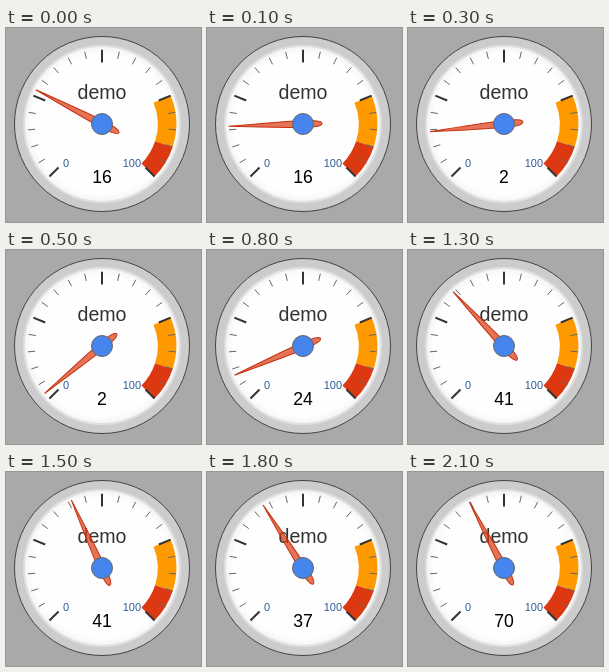
These frames come from a looping animation (195 px wide and 194 px high, 2200 ms). An HTML page with a canvas:

```html
<!DOCTYPE html>
<html>
<head>
<meta charset="utf-8">
<style>
html, body { margin: 0; width: 100%; height: 100%; overflow: hidden; background: #a9a9a9; }
canvas { display: block; }
</style>
</head>
<body>
<canvas id="stage" width="195" height="194"></canvas>
<script>
const ctx = document.getElementById('stage').getContext('2d');
const LOOP = 2200, STEP = 100, SWING = 180;
const CX = 96, CY = 96;

// Start time and new reading; the needle swings linearly to each one.
const readings = [
  { at: -144, value: 16 },
  { at: 280, value: 2 },
  { at: 750, value: 24 },
  { at: 1194, value: 41 },
  { at: 1665, value: 37 },
  { at: 2085, value: 70 }
];

const angle = v => (135 + 2.7 * v) * Math.PI / 180;

function disc(r, fill, stroke, width) {
  ctx.beginPath();
  ctx.arc(CX, CY, r, 0, Math.PI * 2);
  ctx.fillStyle = fill;
  ctx.fill();
  if (stroke) {
    ctx.strokeStyle = stroke;
    ctx.lineWidth = width;
    ctx.stroke();
  }
}

function band(from, to, color) {
  ctx.beginPath();
  ctx.arc(CX, CY, 74.3, angle(from), angle(to));
  ctx.arc(CX, CY, 55.8, angle(to), angle(from), true);
  ctx.fillStyle = color;
  ctx.fill();
}

function tick(v, inner, color, width) {
  const c = Math.cos(angle(v)), s = Math.sin(angle(v));
  ctx.beginPath();
  ctx.moveTo(CX + c * inner, CY + s * inner);
  ctx.lineTo(CX + c * 74.3, CY + s * 74.3);
  ctx.strokeStyle = color;
  ctx.lineWidth = width;
  ctx.stroke();
}

function label(text, x, y, size, color, align) {
  ctx.font = size + 'px "Liberation Sans", Arial, sans-serif';
  ctx.textAlign = align;
  ctx.fillStyle = color;
  ctx.fillText(text, x, y);
}

function needle(v) {
  ctx.save();
  ctx.translate(CX, CY);
  ctx.rotate(angle(v));
  ctx.beginPath();
  ctx.moveTo(74.5, 0);
  ctx.bezierCurveTo(5, 4, -19, 5, -19, 0);
  ctx.bezierCurveTo(-19, -5, 5, -4, 74.5, 0);
  ctx.fillStyle = 'rgba(220, 57, 18, 0.7)';
  ctx.fill();
  ctx.strokeStyle = '#c63310';
  ctx.lineWidth = 1;
  ctx.lineJoin = 'round';
  ctx.stroke();
  ctx.restore();
}

function face() {
  ctx.fillStyle = '#a9a9a9';
  ctx.fillRect(0, 0, 195, 194);
  disc(87.5, '#cccccc', '#444444', 1);
  const glow = ctx.createRadialGradient(CX, CY, 70, CX, CY, 78);
  glow.addColorStop(0, '#fefefe');
  glow.addColorStop(1, '#f4f4f4');
  disc(78, glow, '#e0e0e0', 2);
  band(75, 90, '#ff9900');
  band(90, 100, '#dc3912');
  label('demo', CX, 71, 19.6, '#333333', 'center');
  for (let v = 0; v <= 100; v += 5) {
    if (v % 25) tick(v, 67, '#666666', 1);
    else tick(v, 61.5, '#333333', 2);
  }
  label('0', 57, 139, 11, '#2f5b95', 'left');
  label('100', 135, 139, 11, '#2f5b95', 'right');
}

function draw(t) {
  let i = readings.length - 1;
  while (readings[i].at > t) i--;
  const to = readings[i].value;
  const from = i ? readings[i - 1].value : 70;
  const k = Math.min(1, (t - readings[i].at) / SWING);
  face();
  label(String(to), CX, 155, 17.6, '#000000', 'center');
  needle(from + (to - from) * k);
  disc(10.5, '#4684ee', '#666666', 1);
}

const start = performance.now();
function loop() {
  const t = (performance.now() - start) % LOOP;
  draw(Math.floor(t / STEP) * STEP);
  requestAnimationFrame(loop);
}
loop();
</script>
</body>
</html>
```
